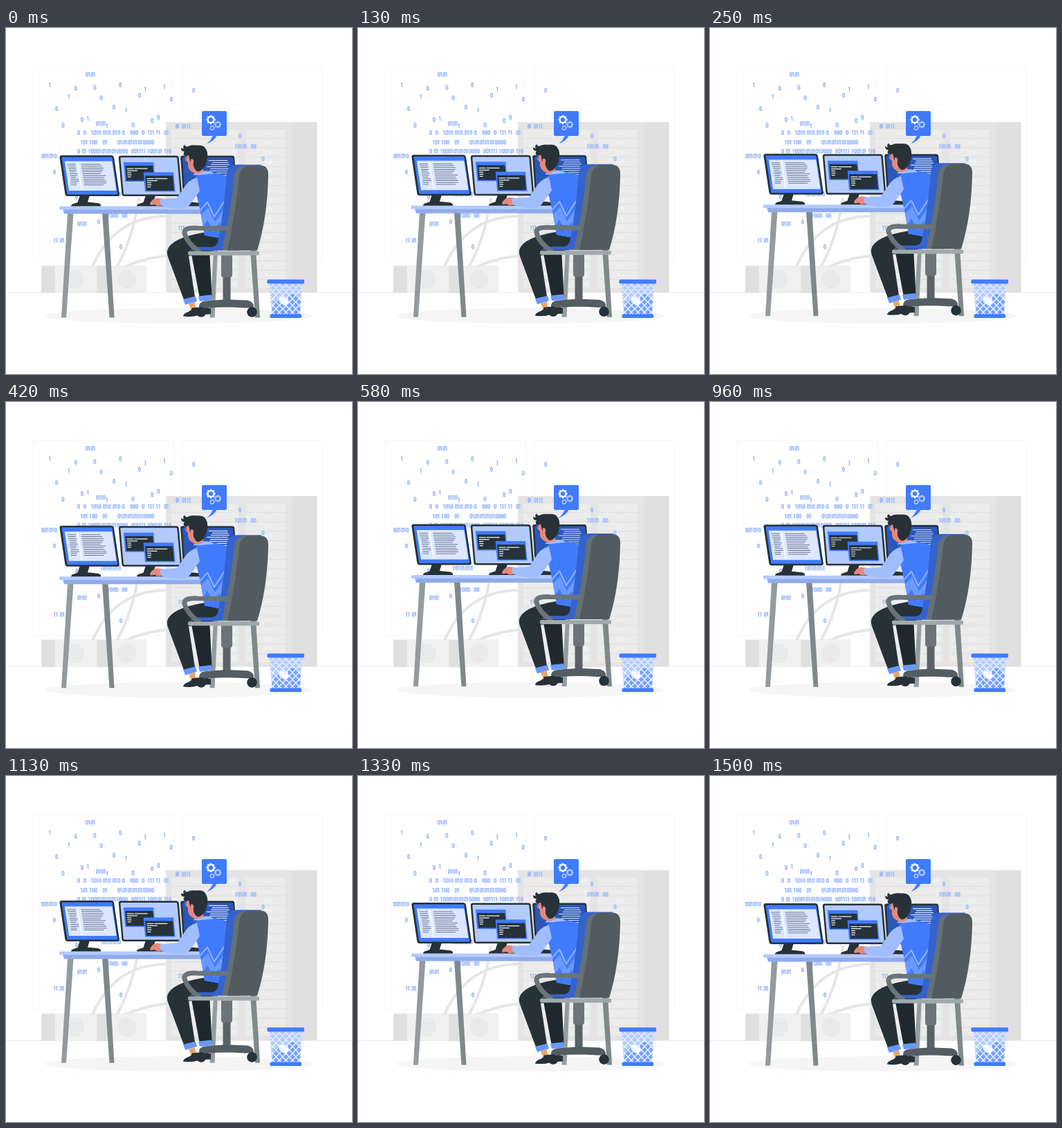
Animation, 500 px wide and 500 px high, one loop 1.54 s. Source, as an HTML page:

```html
<!DOCTYPE html>
<html lang="en">
<head>
<meta charset="utf-8">
<title>Developer at a desk</title>
<style>
  html, body { margin: 0; width: 100%; height: 100%; overflow: hidden; background: #fff; }
  svg { display: block; width: 100%; height: 100%; }
  .line { fill: none; stroke-linecap: round; stroke-linejoin: round; }
  .dark { fill: #263238; }
  .blue { fill: #407bff; }
  .pale { fill: #b3caff; }
  .sleeve { fill: #9fbdff; }
  .skin { fill: #e4897b; }
</style>
</head>
<body>
<svg viewBox="0 0 500 500">
  <defs>
    <clipPath id="basket"><path d="M381 369h47l-3 45h-41z"/></clipPath>
    <clipPath id="vest"><path id="vestShape" d="M273 216Q283 208 297 208L319 214 317 255 309 304 287 300 281 266 275 240z"/></clipPath>
  </defs>

  <!-- room -->
  <g fill="none" stroke="#f7f7f7">
    <rect x="39.500" y="55.500" width="203" height="282"/>
    <rect x="254.500" y="55.500" width="203" height="282"/>
  </g>
  <path d="M0 382.500H500" stroke="#ececec"/>
  <ellipse cx="249.500" cy="416" rx="193" ry="11" fill="#f5f5f5"/>
  <path class="line" stroke="#e6e6e6" stroke-width="4" d="M160 345Q183 305 192 247M123 349Q155 272 232 272M123 377Q170 335 233 329"/>
  <path d="M231 136h218.500v246H231z" fill="#e0e0e0"/>
  <path d="M231 136h183v246H231z" fill="#e4e4e4"/>
  <path d="M239 146h165v230H239z" fill="#ebebeb"/>
  <g id="rack" class="line" stroke="#f6f6f6"></g>
  <g id="fans" class="line" stroke="#e2e2e2" stroke-width="1.300"></g>
  <path id="bits" class="line" stroke="#9fbdff" stroke-width="1.500"/>

  <!-- speech bubble -->
  <rect class="blue" x="283" y="120" width="36" height="36" rx="2"/>
  <path class="blue" d="M299 155q-3 8-9 12.500 11-4 15-12.500z"/>
  <g id="gears" fill="none"></g>

  <!-- waste basket -->
  <g clip-path="url(#basket)">
    <path class="pale" d="M378 369h53v45h-53z"/>
    <path fill="#75a0ff" d="M384 414l3-19 9-5 8 5 7-10h9l6 8-1 21z"/>
    <path fill="#fff" d="M395 388l12 2 2 7-5 5-9-6z"/>
    <path id="mesh" class="line" stroke="#e8f0ff" stroke-width="1.500"/>
  </g>
  <rect class="blue" x="377.500" y="363.500" width="53.500" height="6" rx="1.500"/>
  <rect class="blue" x="381.500" y="413.500" width="45.500" height="5.500" rx="1.500"/>

  <g id="workplace">
    <!-- desk -->
    <path fill="#929b9e" d="M89 268h8.500L87 419h-7zM300 320h6L301.500 419h-7z"/>
    <path fill="#7f898c" d="M139 268h8.500L156.500 419h-7zM353 320h8L367 419h-7z"/>
    <path fill="#90abea" d="M82 262h205v7H84z"/>
    <rect class="pale" x="77" y="258" width="210" height="5" rx="1.500"/>

    <!-- monitors -->
    <g id="stand" class="dark">
      <path d="M107 242h14l-3 10 15 1.500q5 1 4 4.500H94q0-3 5-4l4.500-1.500z"/>
    </g>
    <use href="#stand" x="95"/>
    <use href="#stand" x="150"/>
    <g transform="translate(77 184.500) skewX(8.500)">
      <rect class="dark" width="78.500" height="59" rx="3.500"/>
      <rect class="blue" x="3" y="2.500" width="73" height="54" rx="1.500"/>
      <path fill="#dde7ff" d="M6.500 8.500h68.500v42.500H6.500z"/>
      <path d="M25 9v41" stroke="#fff" stroke-width="1.500"/>
      <path id="code" class="line" stroke="#69778f"/>
    </g>
    <g transform="translate(162.500 185) skewX(5)">
      <rect class="dark" width="87" height="58.500" rx="3.500"/>
      <rect class="pale" x="2.500" y="2.500" width="82" height="53.500" rx="1.500"/>
      <g id="terminal">
        <path class="blue" d="M6.500 9.500H50v28H6.500z"/>
        <path class="dark" d="M8.500 14.500h40v21.500h-40z"/>
        <path class="line" stroke="#e9f0ff" stroke-width="1.200" d="M11 18.500h9m2 0h18M11 21.500h14M11 24.500h5m-5 3h5m-5 3h4"/>
      </g>
      <use href="#terminal" x="27.500" y="14.500"/>
    </g>
    <g transform="translate(252 185) skewX(4)">
      <rect class="dark" width="78" height="58" rx="3"/>
      <rect fill="#2b57b8" x="2.500" y="2.500" width="73.500" height="53" rx="1.500"/>
      <path id="log" class="line" stroke="#dce7ff" stroke-width="1.100"/>
    </g>

    <!-- legs and shoes -->
    <path fill="#1f292d" d="M267 322l27-3 3.500 69-18 1z"/>
    <path class="dark" d="M310 303l-24-7Q238 304 233 322q-1 5 2 12l22 59 16-4-9-59q28-3 44-11z"/>
    <path fill="#6898ff" d="M256 392.500l18-4.500 2 7.500-17 5zM278 388l19-2v8l-17 1.500z"/>
    <path fill="#e9a568" d="M264 399l9-2.500 1.500 9-7 2z"/>
    <path class="dark" d="M256 417q0-4 9-7l4-5 9-1q5 3 11 0l7 2v8q-15 0-20 2-8 2.500-20 1z"/>
    <path fill="#fff" d="M263 409l4-4 1 3z"/>

    <!-- torso -->
    <use href="#vestShape" class="blue"/>
    <g clip-path="url(#vest)">
      <path fill="#6c9aff" d="M279 274l13-14 10 21 18-26v50h-40z"/>
      <path class="line" stroke="#8fb3ff" stroke-width="2" d="M277 268l14-16 10 21 19-29"/>
      <path class="blue" d="M282 292l9-14 9 17 9-14 3 24h-30z"/>
    </g>
    <path class="sleeve" d="M270 213q5-6 17-6 10 0 13 4-13 1-21 2z"/>

    <!-- arm and hand -->
    <path class="skin" d="M208 254q3-6 9-8l10 1 1 10-10 .5-3-2-6 1z"/>
    <path class="sleeve" d="M276 217q-12 2-20 16l-9 13-24 1.500q-2 5 2 9.500 18 6 33 4 5-1 9-7l13-18z"/>

    <!-- head -->
    <path class="skin" d="M262 180l-3 11 4 4q-1 9 5 13 7 6 17 0v-25z"/>
    <path class="blue" d="M258 183l4 .5-1 8-3-1z" opacity=".55"/>
    <path class="dark" d="M257 184q-1-3 1-5-5 0-5-5l4 1q-2-3 1-6 1 3 4 3 5-3 13-2 10-1 13 4 4 5 3 14-1 8-5 14-3 5-9 6-4-2-6-8l-1-9q-1 4-4 2l-2-9q-4 3-7 0z"/>
    <path class="skin" d="M267 190q5-1 4 5-1 4-4 2z"/>

    <!-- chair -->
    <path fill="#3463cf" d="M319 211q2-13 15-13h35l-10 20-46 104h-48l7-5h26q6-1 8-7 9-45 13-99z"/>
    <path fill="#667074" d="M330 213q2-12 14-13.500h24l-30 122.500h-26q12-50 18-109z"/>
    <path fill="#525b5f" d="M337 215q2-14 13-16h17q12 0 12 13-1 62-16 110h-43q12-55 17-107z"/>
    <path class="line" stroke="#6b7579" stroke-width="7" d="M319 290l-43-.500q-20-1-18 8 4 14 20 25"/>
    <rect x="263" y="323" width="103" height="6" rx="2" fill="#a0a9ac"/>
    <path fill="#596367" d="M313.500 356h11v40h-11z"/>
    <path fill="#6b7579" d="M311 329h16v28q0 4-4 4h-8q-4 0-4-4z"/>
    <path fill="#545e62" d="M279 405q-1-9 9-10l26-2h10l25 1q10 2 9 11H345q-26-2-52 0z"/>
    <g class="dark"><circle cx="282" cy="411" r="7.300"/><circle cx="355.500" cy="411" r="7.300"/></g>
  </g>
</svg>

<script>
const $ = id => document.getElementById(id);
const range = (n, draw) => Array.from({ length: n }, (_, i) => draw(i)).join('');
const setPath = (id, d) => $(id).setAttribute('d', d);

let seed = 7;
const random = (min, max) => {
  seed = seed * 16807 % 2147483647;
  return min + (max - min) * seed / 2147483647;
};

// Binary digits drawn as narrow strokes; a space is a small gap.
function digitPath(x, y, text) {
  let d = '';
  for (const c of text) {
    if (c === '0') d += `M${x + .8} ${y - 1.6}q0-1.200 1.200-1.200t1.200 1.200v3.200q0 1.200-1.200 1.200t-1.200-1.200z`;
    if (c === '1') d += `M${x + .4} ${y - 2.3}l1-.5v5.600`;
    x += { 0: 4.1, 1: 3.2 }[c] || 2.4;
  }
  return d;
}

const stream =
  digitPath(115, 67, '0101') + digitPath(130, 138, '0101') +
  digitPath(103, 151, '0  0   1010 010 010 0   000  0  111 11  01') +
  digitPath(108, 165, '101 100   01      01010101010000') +
  digitPath(103, 178, '0 01 100010101010000  001111 100101 110') +
  digitPath(245, 142, '0  0111') + digitPath(331, 171, '10101  00') +
  digitPath(51, 185, '001010') + digitPath(137, 240, '10101010') +
  digitPath(147, 271, '1000  00') + digitPath(103, 283, '0101') +
  digitPath(69, 307, '11 01') + digitPath(249, 289, '111');
const cloud = range(21, i =>
  digitPath(62 + 9.2 * i, 112 - 30 * Math.cos(i * 1.72), i % 3 ? '0' : '1'));
const strays = range(4, i => digitPath(68 + 32 * i, 208 + 36 * i, '0') + digitPath(269 + 33.5 * i, 90 + 33 * i, '0'));
setPath('bits', stream + cloud + strays);

$('rack').innerHTML = range(17, i => {
  const y = 146 + i * 13.6;
  return `<path d="M239 ${y}h165" stroke="#dedede"/>` + range(3, col =>
    `<circle cx="${270 + col * 53}" cy="${y + 6.5}" r="1.300"/><circle cx="${276 + col * 53}" cy="${y + 6.5}" r="2.200"/>`);
}) + '<path d="M341 146v230" stroke="#e4e4e4" stroke-width="11" stroke-linecap="butt"/>';

const fanBox = (left, split, right) =>
  `<g stroke="none"><path d="M${left} 343.500H${right}V383H${left}z" fill="#e0e0e0"/>` +
  `<path d="M${split} 343.500H${right}V383H${split}z" fill="#f0f0f0"/></g>` +
  range(9, i => {
    const y = i * 3 - 12, half = Math.sqrt(180 - y * y);
    return `<path d="M${split + 28 - half} ${363 + y}h${2 * half}"/>`;
  });
$('fans').innerHTML = fanBox(51, 71, 131) + fanBox(131, 147, 203);

setPath('code', range(12, i =>
  `M${10 + random(0, 2)} ${13 + i * 2.7}h${random(7, 12)}m${0} 0M30 ${13 + i * 2.7}h${random(25, 33)}`.replace('m0 0', '')));
setPath('log', range(10, i => `M${random(37, 46)} ${7 + i * 3}H${random(66, 70)}`));
setPath('mesh', range(12, i => `M${336 + i * 9.5} 369l44 46M${378 + i * 9.5} 369l-44 46`));

const gear = (x, y, r, color) =>
  `<g stroke="${color}" transform="translate(${x} ${y})"><circle r="${r}" stroke-width="${r * .55}"/>` +
  range(8, i => `<path d="M0 ${-r}v${-r * .5}" stroke-width="${r * .42}" transform="rotate(${i * 45})"/>`) + '</g>';
$('gears').innerHTML = gear(296, 132.500, 4.5, '#fff') + gear(306, 139.500, 3.5, '#b3caff') + gear(298, 144.500, 2.5, '#b3caff');

// The workplace floats gently up and down, in 37 steps per loop.
const LOOP = 1540, STEPS = 37, LIFT = 8.4, LEAD = 30, BASE = -.4;
function animate(now) {
  const step = Math.floor((now % LOOP) / LOOP * STEPS + .1);
  const angle = 2 * Math.PI * (step / STEPS + LEAD / LOOP);
  $('workplace').setAttribute('transform', `translate(0 ${BASE + LIFT * (Math.cos(angle) - 1) / 2})`);
  requestAnimationFrame(animate);
}
animate(performance.now());
</script>
</body>
</html>
```
